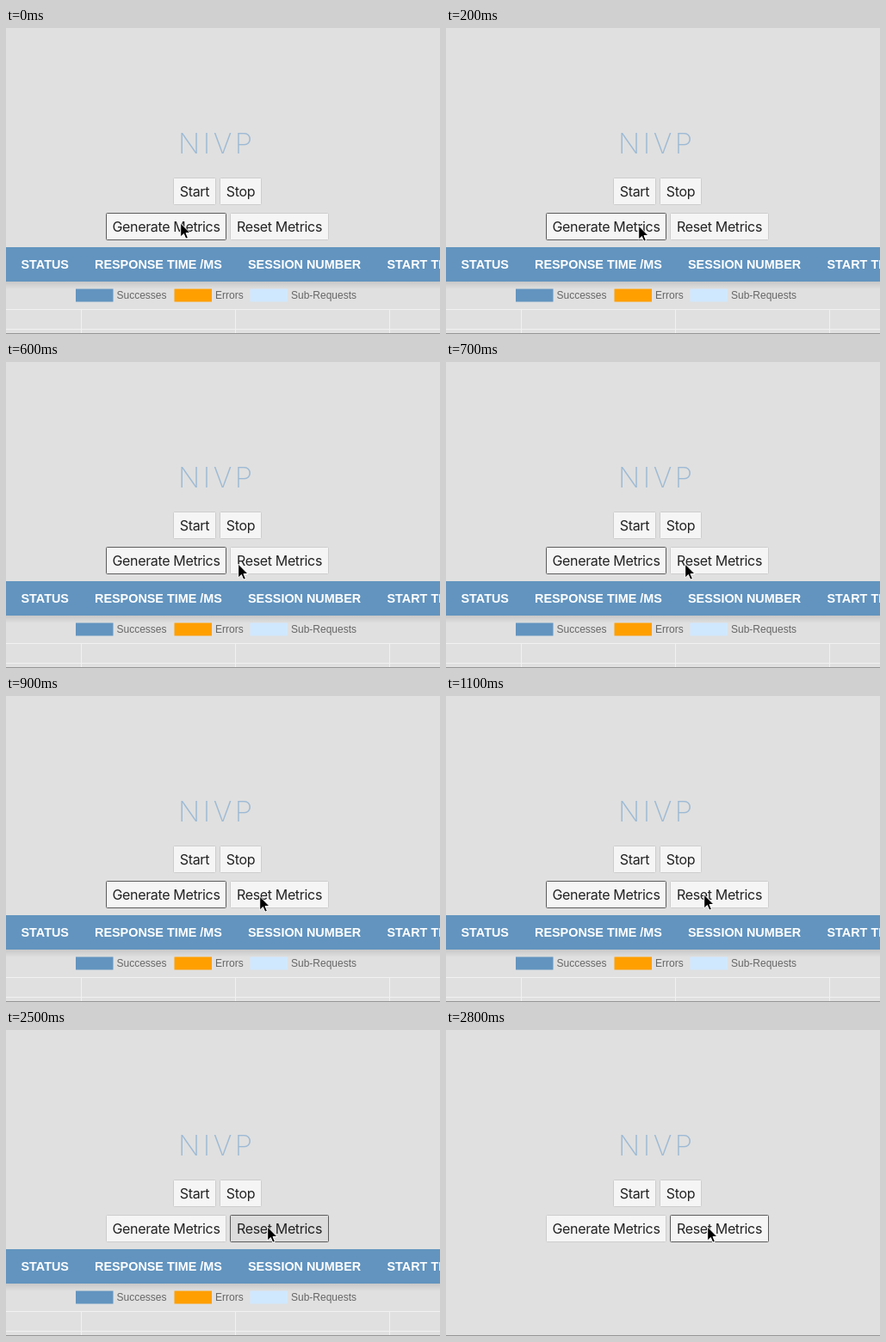
These frames come from a looping animation (504x356 px, 3500 ms). An HTML page:

```html
<!DOCTYPE html>
<html lang="en">
<head>
<meta charset="utf-8">
<style>
  html, body { margin: 0; width: 100%; height: 100%; overflow: hidden; background: #e0e0e0; }
  svg { display: block; }
  .title { font: 200 33px Inter, sans-serif; letter-spacing: 3.5px; fill: #9dbad4; }
  .button rect { fill: #f5f5f5; stroke: #cdcdcd; }
  .button text { font: 16px Inter, sans-serif; letter-spacing: -.35px; fill: #222; text-anchor: middle; }
  .button.focus rect { stroke: #5c5c5c; }
  .button.pressed rect { fill: #dcdcdc; }
  .head { font: bold 14.4px "Liberation Sans", Arial, sans-serif; fill: #fff; }
  .legend { font: 12px "Liberation Sans", Arial, sans-serif; fill: #666; }
</style>
</head>
<body>
<svg width="504" height="356" viewBox="0 0 504 356">
  <defs>
    <linearGradient id="shadow" x2="0" y2="1">
      <stop stop-color="#000" stop-opacity=".11"/>
      <stop offset="1" stop-color="#000" stop-opacity="0"/>
    </linearGradient>
  </defs>
  <rect width="504" height="356" fill="#e0e0e0"/>
  <text class="title" x="200" y="146">NIVP</text>
  <g id="buttons"></g>
  <g id="panel">
    <path d="M0 327.5H504M0 350.5H504M87.5 327V356M266.5 327V356M445.5 327V356" stroke="#f1f1f1"/>
    <rect y="295" width="504" height="9" fill="url(#shadow)"/>
    <rect y="255" width="504" height="40" fill="#6294bf"/>
  </g>
  <path d="M0 355.5H504" stroke="#959595"/>
  <path id="cursor" d="M.7 1V17L4.4 13.5 6.8 19.2 9.4 18.1 7 12.5H12Z" fill="#000" stroke="#fff"/>
</svg>
<script>
const LOOP = 3500, STEP = 100, PRESS = 2500, RELEASE = 2800;
const $ = id => document.getElementById(id);

function add(parent, tag, attrs, text = '') {
  const node = document.createElementNS('http://www.w3.org/2000/svg', tag);
  for (const key in attrs) node.setAttribute(key, attrs[key]);
  node.textContent = text;
  return parent.appendChild(node);
}

function button(label, x, y, width) {
  const group = add($('buttons'), 'g', { class: 'button' });
  add(group, 'rect', { x: x + .5, y: y + .5, width: width - 1, height: 31, rx: 1 });
  add(group, 'text', { x: x + width / 2, y: y + 22 }, label);
  return group;
}

button('Start', 194, 174, 50);
button('Stop', 248, 174, 49);
const generate = button('Generate Metrics', 116, 215, 140);
const reset = button('Reset Metrics', 260, 215, 115);

[['STATUS', 17.5], ['RESPONSE TIME /MS', 103], ['SESSION NUMBER', 281], ['START TIME', 442.5]]
  .forEach(([label, x]) => add($('panel'), 'text', { class: 'head', x, y: 280 }, label));

[['Successes', 81, '#6294bf'], ['Errors', 195.5, '#ff9f00'], ['Sub-Requests', 283.5, '#d0e8fe']]
  .forEach(([label, x, fill]) => {
    add($('panel'), 'rect', { x, y: 303.5, width: 43.5, height: 15, fill });
    add($('panel'), 'text', { class: 'legend', x: x + 47.5, y: 315 }, label);
  });

// Cursor waypoints: time, x, y
const route = [
  [0, 202, 226], [400, 243, 232], [600, 269, 234], [700, 277, 234],
  [900, 294, 232], [1200, 302, 229], [1300, 303, 228], [LOOP, 303, 228]
];

function cursorAt(t) {
  const i = route.findIndex(p => p[0] > t);
  const a = route[i - 1], b = route[i];
  const k = (t - a[0]) / (b[0] - a[0]);
  return [1, 2].map(n => Math.round(a[n] + (b[n] - a[n]) * k));
}

function draw(now) {
  const t = Math.floor(now % LOOP / STEP) * STEP;
  $('cursor').setAttribute('transform', `translate(${cursorAt(t)})`);
  generate.classList.toggle('focus', t < PRESS);
  reset.classList.toggle('focus', t >= PRESS);
  reset.classList.toggle('pressed', t >= PRESS && t < RELEASE);
  $('panel').style.display = t < RELEASE ? '' : 'none';
}

let start;
function tick(now) {
  start ??= now;
  draw(now - start);
  requestAnimationFrame(tick);
}
draw(0);
requestAnimationFrame(tick);
</script>
</body>
</html>
```
